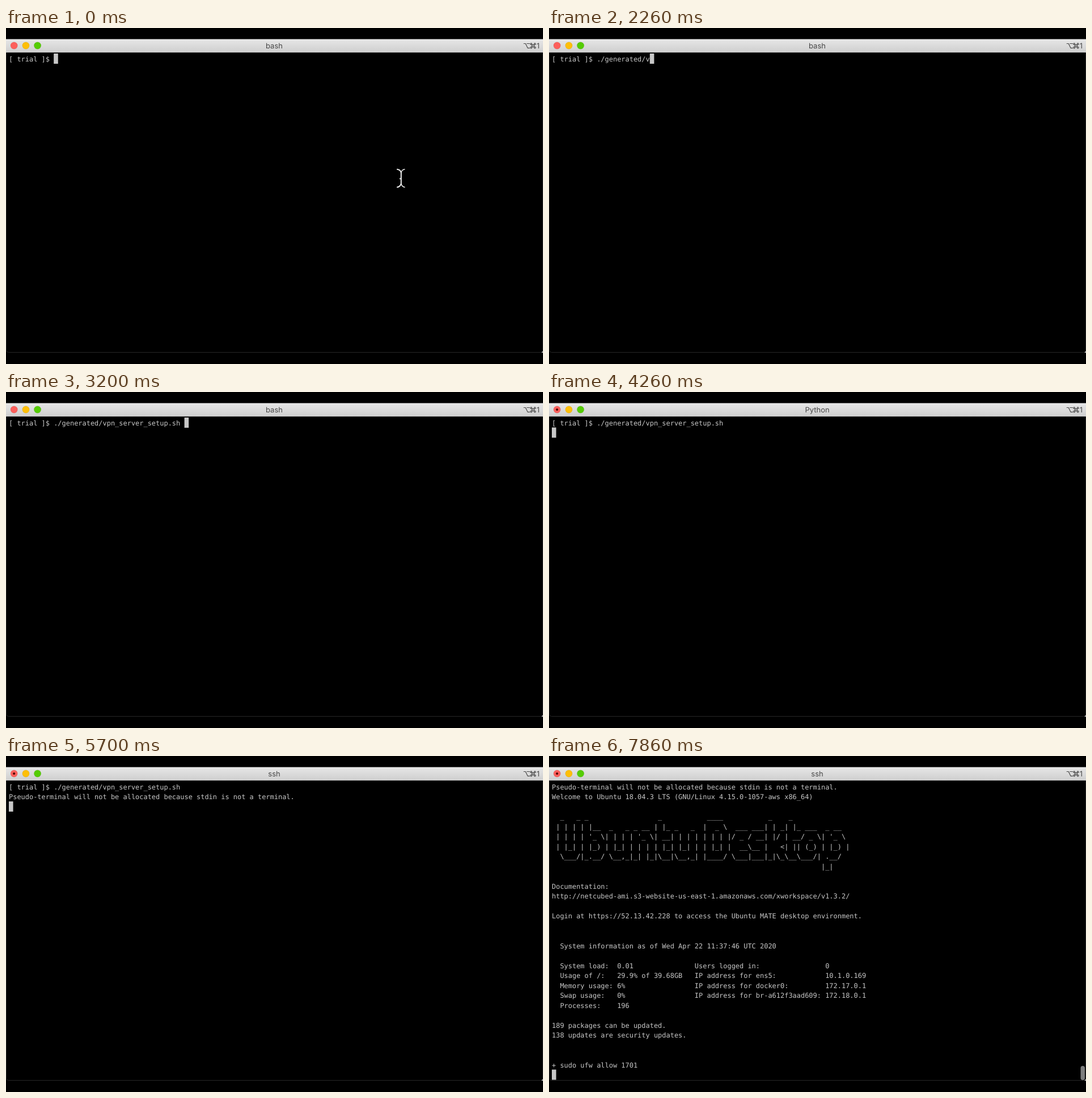
Write an HTML page that moves like this. It is 947x592 px and loops after 8 s.

```html
<!DOCTYPE html>
<html lang="en">
<head>
<meta charset="utf-8">
<title>Terminal</title>
<style>
  html, body { margin: 0; width: 100%; height: 100%; overflow: hidden; background: #000; }
  svg { display: block; width: 947px; height: 592px; }
  text { text-rendering: geometricPrecision; }
  #lines text { font: 11.96px "DejaVu Sans Mono", monospace; fill: #c7c7c7; white-space: pre; font-variant-ligatures: none; }
  .bar { font: 13px Inter, Roboto, sans-serif; fill: #474747; }
  .line { fill: none; stroke-linecap: round; stroke-linejoin: round; }
</style>
</head>
<body>
<svg viewBox="0 0 947 592">
  <defs>
    <linearGradient id="chrome" x2="0" y2="1">
      <stop offset="0" stop-color="#e7e7e7"/>
      <stop offset="1" stop-color="#cecece"/>
    </linearGradient>
  </defs>
  <rect width="947" height="592" fill="#000"/>
  <path d="M947 568V572H943Q946 571.5 947 568Z" fill="#ddd"/>
  <path d="M.5 43V567.5Q.5 571.5 4.5 571.5H942.5Q946.5 571.5 946.5 567.5V43" fill="#000" stroke="#262626"/>
  <rect y="19.6" width="947" height="23.6" fill="url(#chrome)"/>

  <g stroke="#000" stroke-opacity=".12" stroke-width=".6">
    <circle cx="14.2" cy="31" r="6.2" fill="#fc605c"/>
    <circle cx="35" cy="31" r="6.2" fill="#fdbf08"/>
    <circle cx="55.6" cy="31" r="6.2" fill="#55cc05"/>
  </g>
  <circle id="busy" cx="14.2" cy="31" r="2.1" fill="#4c0502"/>

  <text id="title" class="bar" y="36" text-anchor="middle"></text>
  <g id="bell">
    <path d="M455.5 23.5C451.6 23.5 450.6 27 450.4 30C450.2 33 449.5 34.4 448 36.5H463C461.5 34.4 460.8 33 460.6 30C460.4 27 459.4 23.5 455.5 23.5Z" fill="#e9b52c"/>
    <circle cx="455.5" cy="23.8" r="1.3" fill="#c48a17"/>
    <path d="M453.4 37H457.6Q457.2 39.4 455.5 39.4Q453.8 39.4 453.4 37Z" fill="#a8700f"/>
  </g>

  <g class="line" stroke="#474747" stroke-width="1.2">
    <path d="M913.2 27.5H916.2L920 35.3H923.4M918.8 27.5H923.4"/>
    <rect x="927.6" y="29.6" width="3.6" height="3.6"/>
    <circle cx="926.2" cy="28.2" r="1.4"/>
    <circle cx="932.6" cy="28.2" r="1.4"/>
    <circle cx="926.2" cy="34.6" r="1.4"/>
    <circle cx="932.6" cy="34.6" r="1.4"/>
  </g>
  <text class="bar" x="935.8" y="36">1</text>

  <g id="lines"></g>
  <rect id="cursor" width="7.6" height="18" fill="#c7c7c7"/>
  <rect id="scroll" x="937.5" y="546" width="7.5" height="25" rx="3.75" fill="#7d7d7d"/>
  <g id="pointer" class="line" stroke="#eee" stroke-width="2">
    <path d="M690 249Q695.5 249.5 696.8 255V274Q695.5 279.5 690 280.5M694.8 265.5H697"/>
    <path d="M703 249Q698 249.5 696.8 255M696.8 274Q698 279.5 703 280.5" stroke-width="1.4"/>
  </g>
</svg>
<script>
const LOOP = 8000, LEFT = 5, TOP = 45, CELL = 7.2, ROW = 17.5, ROWS = 30;
const prompt = "[ trial ]$ ";
const dir = "./generated/";
const command = prompt + dir + "vpn_server_setup.sh ";
const notice = "Pseudo-terminal will not be allocated because stdin is not a terminal.";

const welcome = String.raw`Welcome to Ubuntu 18.04.3 LTS (GNU/Linux 4.15.0-1057-aws x86_64)

  _   _ _                 _           ____           _    _
 | | | | |__  _   _ _ __ | |_ _   _  |  _ \  ___ ___| | _| |_ ___  _ __
 | | | | '_ \| | | | '_ \| __| | | | | | | |/ _ / __| |/ | __/ _ \| '_ \
 | |_| | |_) | |_| | | | | |_| |_| | | |_| |  __\__ |   <| || (_) | |_) |
  \___/|_.__/ \__,_|_| |_|\__|\__,_| |____/ \___|___|_|\_\__\___/| .__/
                                                                  |_|

Documentation:
http://netcubed-ami.s3-website-us-east-1.amazonaws.com/xworkspace/v1.3.2/

Login at https://52.13.42.228 to access the Ubuntu MATE desktop environment.


  System information as of Wed Apr 22 11:37:46 UTC 2020

  System load:  0.01               Users logged in:                0
  Usage of /:   29.9% of 39.68GB   IP address for ens5:            10.1.0.169
  Memory usage: 6%                 IP address for docker0:         172.17.0.1
  Swap usage:   0%                 IP address for br-a612f3aad609: 172.18.0.1
  Processes:    196

189 packages can be updated.
138 updates are security updates.


`.split("\n");

const login = [command, notice, ...welcome];
const typed = text => ({ text: [prompt + text] });

// Each entry changes only the listed parts of the screen.
const events = [
  [0, { ...typed(""), title: "bash", busy: false, bell: false, pointer: true, scroll: false }],
  [500, typed(".")],
  [560, { pointer: false }],
  [630, typed("./")],
  [1000, typed("./g")],
  [1100, typed(dir)],
  [2260, typed(dir + "v")],
  [2400, typed(dir + "vpn_")],
  [2500, { bell: true }],
  [2930, typed(dir + "vpn_s")],
  [2980, { bell: false }],
  [3030, typed(dir + "vpn_se")],
  [3200, { text: [command] }],
  [3860, { text: [command, ""] }],
  [4260, { title: "Python", busy: true }],
  [5000, { text: [command, notice, ""] }],
  [5700, { title: "ssh" }],
  [7730, { text: login }],
  [7860, { text: [...login.slice(0, -1), "+ sudo ufw allow 1701", ""], scroll: true }]
];

const el = id => document.getElementById(id);
const show = (id, on) => el(id).setAttribute("visibility", on ? "visible" : "hidden");
const rows = Array.from({ length: ROWS }, (_, i) => {
  const row = document.createElementNS("http://www.w3.org/2000/svg", "text");
  row.setAttribute("x", LEFT);
  row.setAttribute("y", TOP + i * ROW + 13.5);
  return el("lines").appendChild(row);
});

function draw(state) {
  const visible = state.text.slice(-ROWS);
  const last = visible.length - 1;
  rows.forEach((row, i) => row.textContent = visible[i] || "");
  el("cursor").setAttribute("x", LEFT + visible[last].length * CELL);
  el("cursor").setAttribute("y", TOP + last * ROW);
  el("title").textContent = state.title;
  el("title").setAttribute("x", state.bell ? 483.5 : 473);
  for (const id of ["busy", "bell", "pointer", "scroll"]) show(id, state[id]);
}

let shown = 0;
function frame(now) {
  const time = now % LOOP;
  const past = events.filter(([start]) => start <= time);
  if (past.length !== shown) {
    shown = past.length;
    draw(Object.assign({}, ...past.map(([, change]) => change)));
  }
  requestAnimationFrame(frame);
}
frame(0);
</script>
</body>
</html>
```
